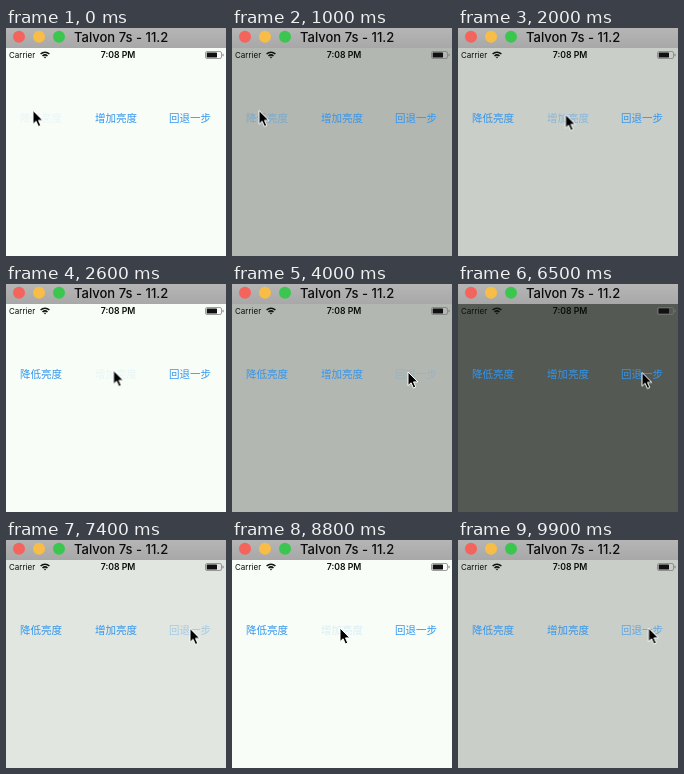
An HTML page for the animation above (10 s loop, 220 px wide and 228 px high).

```html
<!DOCTYPE html>
<html lang="zh">
<head>
<meta charset="utf-8">
<title>Brightness steps</title>
<style>
  html, body { margin: 0; width: 100%; height: 100%; overflow: hidden; }
  svg { display: block; width: 220px; height: 228px; }
  text { font-family: Inter, "Liberation Sans", sans-serif; fill: #0c0c0c; }
  .btn { font: 500 10.5px "Noto Sans CJK SC", "Noto Sans CJK", sans-serif; fill: #3296ee; }
  #cursor { animation: visit 10s ease-in-out infinite; }
  @keyframes visit {
    0%, 13% { transform: translate(27px, 82.5px); }
    17%, 33.5% { transform: translate(107.5px, 86.5px); }
    36%, 44.5% { transform: translate(176px, 88px); }
    47%, 58% { transform: translate(20.5px, 87px); }
    63.5%, 83.5% { transform: translate(184px, 88.5px); }
    87%, 90% { transform: translate(108px, 88px); }
    93.5%, 100% { transform: translate(190.5px, 88px); }
  }
</style>
</head>
<body>
<svg viewBox="0 0 220 228">
  <defs>
    <linearGradient id="bar" x2="0" y2="1">
      <stop offset="0" stop-color="#b5b5b5"/>
      <stop offset="1" stop-color="#a8a8a8"/>
    </linearGradient>
  </defs>

  <rect id="screen" y="20" width="220" height="208"/>
  <rect width="220" height="20" fill="url(#bar)"/>
  <circle cx="13" cy="8.7" r="6" fill="#f3655c"/>
  <circle cx="33" cy="8.7" r="6" fill="#f8bd47"/>
  <circle cx="53" cy="8.7" r="6" fill="#3bc74f"/>
  <text x="68" y="13.5" font-size="13" font-weight="500">Talvon 7s - 11.2</text>

  <text x="3" y="30" font-size="8">Carrier</text>
  <g fill="none" stroke="#111" stroke-width="1.5">
    <path d="M34.6 26a6.4 6.4 0 0 1 8.8 0M36.5 28a3.7 3.7 0 0 1 5 0"/>
    <path d="M37.7 28.8h2.6L39 30.6z" fill="#111" stroke="none"/>
  </g>
  <text x="112" y="30" font-size="8.7" font-weight="600" text-anchor="middle">7:08 PM</text>
  <rect x="199.5" y="23.5" width="16" height="7" rx="1.5" fill="none" stroke="#777" stroke-width=".7"/>
  <rect x="200.7" y="24.4" width="10.3" height="5.2" rx=".6" fill="#111"/>
  <path d="M217 25.8v2.4" stroke="#777"/>

  <text class="btn" x="14" y="93.5">降低亮度</text>
  <text class="btn" x="89" y="93.5">增加亮度</text>
  <text class="btn" x="163" y="93.5">回退一步</text>

  <path id="cursor" d="M0 0V13.6L3.1 10.8L5.4 16L7.8 15L5.5 9.9H9.8Z"
        fill="#000" stroke="#fff" stroke-linejoin="round"/>
</svg>
<script>
  const LOOP = 10000, HOLD = 60, FADE = 270, MAX = 10, SHADE = 23.4;
  const DIM = 0, LIFT = 1, UNDO = 2;

  // A run of evenly spaced clicks on one button
  const burst = (btn, step, first, gap, count) =>
    Array.from({ length: count }, (_, i) => ({ btn, step, at: first + i * gap }));

  const clicks = [
    ...burst(DIM, -1, 50, 425, 3),
    ...burst(LIFT, 1, 1900, 250, 5),
    ...burst(UNDO, -1, 3700, 140, 3),
    ...burst(UNDO, 1, 4120, 140, 3),
    ...burst(DIM, -1, 4720, 155, 7),
    ...burst(UNDO, 1, 6610, 142, 7),
    ...burst(LIFT, 1, 8780, 160, 2),
    ...burst(UNDO, -1, 9560, 160, 2)
  ];

  const clamp = (v, top) => Math.max(0, Math.min(top, v));

  const levelAt = t => clicks.reduce(
    (level, c) => c.at <= t ? clamp(level + c.step, MAX) : level, MAX);

  // A label is faint while pressed, then fades back in
  function alphaAt(t, btn) {
    const shown = clicks.filter(c => c.btn === btn).map(c => {
      const since = (t - c.at + LOOP) % LOOP;
      return since >= LOOP - HOLD ? 0 : clamp(since / FADE, 1);
    });
    return 0.08 + 0.92 * Math.min(...shown);
  }

  const screen = document.getElementById("screen");
  const buttons = document.querySelectorAll(".btn");
  const start = performance.now();

  function draw() {
    const t = (performance.now() - start) % LOOP;
    const dark = (MAX - levelAt(t)) * SHADE;
    screen.setAttribute("fill", `rgb(${[248, 253, 247].map(c => Math.round(c - dark))})`);
    buttons.forEach((b, i) => b.setAttribute("opacity", alphaAt(t, i)));
    requestAnimationFrame(draw);
  }
  draw();
</script>
</body>
</html>
```
